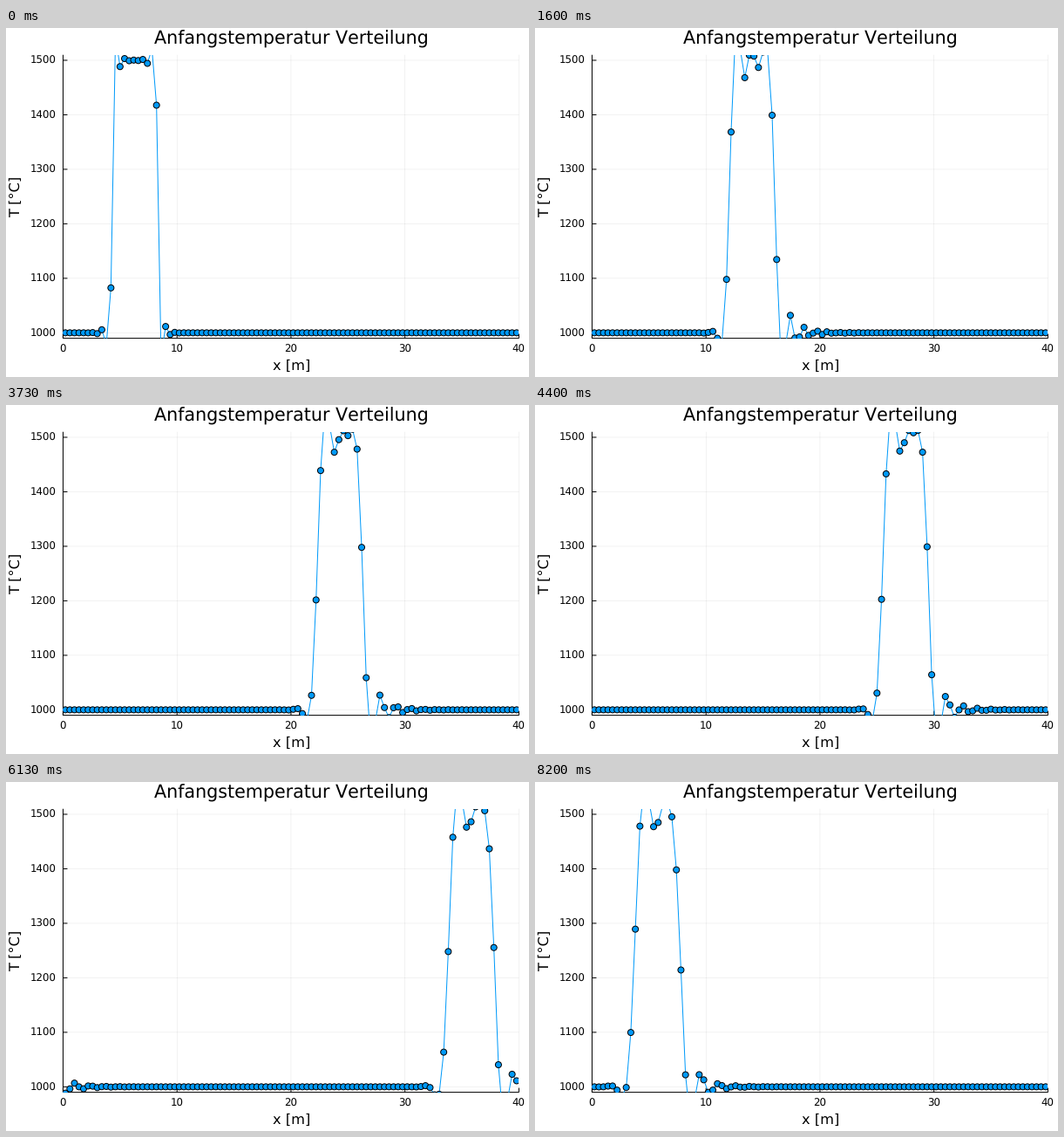
Recreate the animation shown at these times as a matplotlib script. Size 600 by 400 pixels, loop 8270 ms.

```python
import matplotlib.pyplot as plt
import numpy as np
from matplotlib.animation import FuncAnimation
from matplotlib.collections import LineCollection

W, H, DPI = 600, 400, 100
LEFT, RIGHT, TOP, BOTTOM = 65.45, 588.45, 30.75, 355.6
BLUE = "#009afa"
PX = 72 / DPI  # points per pixel

# The pulse advances 15 times a second; frames are finer than the steps
LOOP_MS, FRAMES, STEPS = 8270, 413, 124
INTERVAL = LOOP_MS / FRAMES
STEP_MS = 1000 / 15
ROUNDING_MS = 5  # step times are rounded to 10 ms

# Factor 6 makes kerning negligible
plt.rcParams.update({"font.family": "DejaVu Sans", "text.hinting": "none",
                     "text.kerning_factor": 6})

# Periodic grid with a hot block between 4 m and 8 m
N, LENGTH = 100, 40
DX = LENGTH / N
T_MIN, T_MAX = 990, 1510
x = (np.arange(N) + 0.5) * DX
start = np.where((x > 4) & (x < 8), 1500.0, 1000.0)

# Semi-Lagrangian advection with cubic splines, 0.8 cells per step:
# one step multiplies every Fourier mode by `gain`.
COURANT = 0.8
t = 1 - COURANT
theta = 2 * np.pi * np.fft.fftfreq(N)
weights = [
    (1 - t) ** 3,
    4 - 6 * t**2 + 3 * t**3,
    1 + 3 * t + 3 * t**2 - 3 * t**3,
    t**3,
]
shift = sum(w * np.exp(1j * theta * m) for m, w in zip(range(-1, 3), weights))
gain = np.exp(-1j * theta) * shift / (4 + 2 * np.cos(theta))
modes = np.fft.fft(start)


def temperature(step):
    return np.fft.ifft(modes * gain**step).real


fig = plt.figure(figsize=(W / DPI, H / DPI), dpi=DPI, facecolor="white")

# Frame, grid and text live on a page measured in pixels
page = fig.add_axes([0, 0, 1, 1])
page.set(xlim=(0, W), ylim=(H, 0))
page.set_axis_off()


def strokes(segments, width=1, alpha=1):
    page.add_collection(
        LineCollection(segments, colors="black", linewidths=width * PX,
                       alpha=alpha, snap=False), autolim=False)


def label(px, py, text, size, ha="center", rotation=0):
    page.text(px, py, text, fontsize=size * PX, ha=ha, va="baseline",
              rotation=rotation, rotation_mode="anchor")


def to_px(v):
    return LEFT + v / LENGTH * (RIGHT - LEFT)


def to_py(v):
    return BOTTOM - (v - T_MIN) / (T_MAX - T_MIN) * (BOTTOM - TOP)


TICK = 5
x_ticks = [(v, to_px(v)) for v in range(0, LENGTH + 1, 10)]
y_ticks = [(v, to_py(v)) for v in range(1000, 1501, 100)]
strokes([[(p, TOP), (p, BOTTOM)] for _, p in x_ticks]
        + [[(LEFT, p), (RIGHT, p)] for _, p in y_ticks], 0.5, 0.1)
strokes([[(p, BOTTOM), (p, BOTTOM - TICK)] for _, p in x_ticks]
        + [[(LEFT, p), (LEFT + TICK, p)] for _, p in y_ticks]
        + [[(LEFT, TOP), (LEFT, BOTTOM)], [(LEFT, BOTTOM), (RIGHT, BOTTOM)]])

mid_x, mid_y = (LEFT + RIGHT) / 2, (TOP + BOTTOM) / 2
label(mid_x + 0.5, 19, "Anfangstemperatur Verteilung", 20.6)
label(mid_x + 0.5, 392, "x [m]", 16.2)
label(16, mid_y, "T [°C]", 16.2, rotation=90)
for v, p in x_ticks:
    label(p - 0.5, 371.5, str(v), 11.8)
for v, p in y_ticks:
    label(57.5, p + 4.3, str(v), 11.8, ha="right")

ax = fig.add_axes(
    [LEFT / W, 1 - BOTTOM / H, (RIGHT - LEFT) / W, (BOTTOM - TOP) / H]
)
ax.set(xlim=(0, LENGTH), ylim=(T_MIN, T_MAX))
ax.set_axis_off()
line, = ax.plot(x, start, color=BLUE, linewidth=PX, zorder=3)
# One size per dot keeps sub-pixel positions
dots = ax.scatter(x, start, s=np.full(N, (7 * PX) ** 2), facecolor=BLUE,
                  edgecolor="black", linewidth=PX, zorder=4)


def update(frame):
    now = (frame + 1) * INTERVAL + ROUNDING_MS
    step = min(int(now / STEP_MS) + 1, STEPS)
    temp = temperature(step)
    line.set_ydata(temp)
    dots.set_offsets(np.column_stack([x, temp]))
    return line, dots


anim = FuncAnimation(fig, update, frames=FRAMES, interval=INTERVAL,
                     repeat=True, repeat_delay=0)
plt.show()
```
